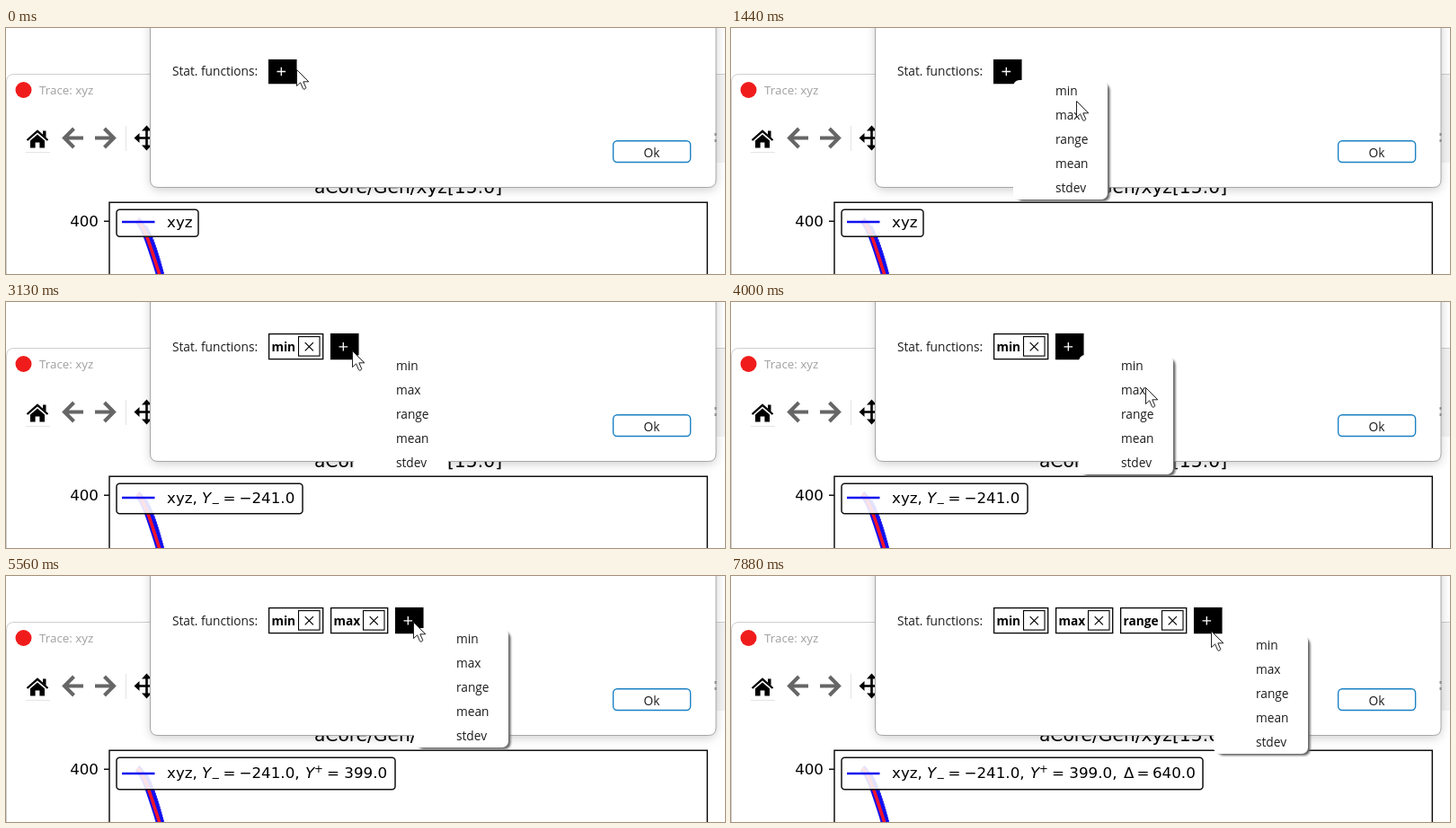
Recreate the animation shown at these times as an HTML page. Size 800x274 px, loop 8000 ms.

```html
<!DOCTYPE html>
<html lang="en">
<head>
<meta charset="utf-8">
<title>Stat. functions</title>
<style>
  html, body { margin: 0; width: 100%; height: 100%; overflow: hidden; background: #fff; }
  svg { display: block; width: 100%; height: 100%; }
  .ui { font: 13.7px "Open Sans", sans-serif; fill: #1c1c1c; }
  .bold { font-weight: 700; fill: #000; }
  .plot { font: 16.7px "DejaVu Sans", sans-serif; fill: #000; }
  .it { font-style: italic; }
  .small { font-size: 11.7px; }
  .box { fill: #fff; stroke: #000; stroke-width: 1.3; }
  .line { fill: none; stroke: #000; stroke-width: 1.2; }
</style>
</head>
<body>
<svg viewBox="0 0 800 274">
  <defs>
    <filter id="soft" x="-10%" y="-20%" width="120%" height="140%"><feGaussianBlur stdDeviation="6"/></filter>
    <filter id="edge" x="-10%" y="-10%" width="120%" height="120%"><feGaussianBlur stdDeviation="0.8"/></filter>
  </defs>
  <rect width="800" height="274" fill="#fff"/>

  <!-- trace window -->
  <path d="M0.5 274V60Q0.5 51.5 9 51.5H800" fill="none" stroke="#cfcfcf"/>
  <rect x="780" y="52" width="20" height="98" fill="#f3f3f3"/>
  <circle cx="19.5" cy="69" r="9" fill="#f01c1c"/>
  <text class="ui" x="37" y="74" style="font-size:13.4px;fill:#a0a0a0">Trace: xyz</text>
  <path d="M22 138.5H49M133.5 109V137" stroke="#e4e4e4" fill="none"/>
  <path d="M23.5 125L35 114.8L46.500 125" fill="none" stroke="#000" stroke-width="2.3"/>
  <path d="M41 114.500H44.500V122L41 119ZM27 125.500L35 118.400L43 125.500V133.500H37.400V127.500H32.600V133.500H27Z"/>
  <g fill="none" stroke="#666" stroke-width="4">
    <path d="M86 122.500H66M75.500 112L65 122.500L75.500 133"/>
    <path d="M99 122.500H119M109.500 112L120 122.500L109.500 133"/>
  </g>
  <path d="M146 122.500H168M156.500 112V133" stroke="#000" stroke-width="2.6"/>
  <path d="M142.500 122.500L148.500 117V128ZM156.500 108.500L151 114.500H162ZM156.500 136.500L151 130.500H162Z"/>

  <!-- plot -->
  <text class="plot" x="447.500" y="183.500" text-anchor="middle" style="font-size:20.200px">aCore/Gen/xyz[15:0]</text>
  <text class="plot" x="103" y="221.300" text-anchor="end">400</text>
  <g fill="none">
    <path id="band" stroke="#1010f0" stroke-width="3"/>
    <path d="M146 214C154 220 161 244 172.500 280" stroke="#1010f0" stroke-width="7.500"/>
    <path d="M146 214C154 220 161 244 172.500 280" stroke="#f0142c" stroke-width="3.600"/>
    <path d="M115 280V194.300H780.300V280M109 215.300H115" stroke="#111" stroke-width="1.500"/>
  </g>
  <g id="legend"></g>

  <!-- dialog -->
  <rect x="161" y="-20" width="629" height="200" rx="8" fill="#000" opacity=".2" filter="url(#soft)"/>
  <path d="M160.500 -5V169Q160.500 177.500 169 177.500H781.500Q790 177.500 790 169V-5Z" fill="#fff" stroke="#a6a6a6"/>
  <path d="M789.500 117V120M789.500 124V127" stroke="#8a8a8a" stroke-width="2"/>
  <rect x="675.600" y="125.700" width="86" height="23.800" rx="4.500" fill="#fff" stroke="#1a80c4" stroke-width="1.400"/>
  <text class="ui" x="718.500" y="143.500" text-anchor="middle">Ok</text>
  <text id="label" class="ui" x="185" y="53">Stat. functions:</text>
  <g id="tokens"></g>
  <g id="plus">
    <rect class="box" x=".6" y="35.600" width="30.300"/>
    <path fill="none" stroke-width="1.300"/>
  </g>

  <g id="menu">
    <rect id="shade" x="4" y="4" width="103.500" height="131" rx="7" fill="#666" filter="url(#edge)"/>
    <rect width="105" height="133" rx="7" fill="#fff"/>
  </g>
  <path id="cursor" d="M.5 .5V18.600L4.600 14.800L7.500 21.600Q8 22.500 9 22.100L10.200 21.500Q11 21 10.600 20.100L7.800 13.800H13.800Z" fill="#fff" stroke="#222" stroke-width="1" stroke-linejoin="round"/>
</svg>
<script>
const NS = "http://www.w3.org/2000/svg";
const LOOP = 8000, STEP = 62.5;
const $ = id => document.getElementById(id);

function add(parent, tag, attrs, text) {
  const el = document.createElementNS(NS, tag);
  for (const k in attrs) el.setAttribute(k, attrs[k]);
  if (text) el.textContent = text;
  parent.appendChild(el);
  return el;
}
const cross = (x, y, r) => `M${x - r} ${y - r}L${x + r} ${y + r}M${x - r} ${y + r}L${x + r} ${y - r}`;

// ragged blue edge along the falling curve
let edge = "";
for (let y = 222; y < 276; y += 3) {
  const x = 146 + 25.5 * Math.pow((y - 214) / 60, 0.62);
  edge += `M${x - 4.6} ${y}h9.200`;
}
$("band").setAttribute("d", edge);

// function tokens
const tokens = [["min", 292, 61], ["max", 361, 64], ["range", 433, 74]].map(([name, x, w]) => {
  const g = add($("tokens"), "g", {});
  add(g, "rect", { class: "box", x: x + .6, y: 35.6, width: w - .9, height: 28 });
  add(g, "text", { class: "ui bold", x: x + 3.5, y: 55.3 }, name);
  add(g, "rect", { class: "box", x: x + w - 27.5, y: 38.6, width: 23.500, height: 21.500, style: "stroke-width:1.1" });
  add(g, "path", { class: "line", d: cross(x + w - 15.7, 49.8, 4.6) });
  return g;
});

// legend: box, sample line and the parts of its text
const frame = add($("legend"), "rect", { x: 123, y: 202.300, rx: 3.500, fill: "#fff", "fill-opacity": .88, stroke: "#111", "stroke-width": 1.500 });
const sample = add($("legend"), "path", { stroke: "#1010f0", "stroke-width": 2.400 });
const words = add($("legend"), "g", {});
const parts = [
  [[179, "xyz"]],
  [[207.500, ","], [218, "Y", "it"], [228.500, "−", "small", 3.500], [241.500, "="], [259.500, "−241.0"]],
  [[321.300, ","], [333, "Y", "it"], [343, "+", "small", -6], [357, "="], [376.300, "399.0"]],
  [[424.300, ","], [437, "Δ"], [451.500, "="], [469, "640.0"]]
].map(list => {
  const g = add(words, "g", {});
  for (const [x, s, cls = "", dy = 0] of list) add(g, "text", { class: "plot " + cls, x, y: dy }, s);
  return g;
});
const looks = [[91, 30, 216, 222.300], [207, 33.500, 218, 224], [310, 35.500, 220, 225], [402, 35.500, 220, 225]];

["min", "max", "range", "mean", "stdev"].forEach((s, i) =>
  add($("menu"), "text", { class: "ui", x: 47, y: 17 + 26.900 * i }, s));

// per round: plus button x, hover step, menu step, pick step, menu corner
const rounds = [
  { x: 292, hover: 0, open: 9, pick: 32, at: [314, 58] },
  { x: 361, hover: 43, open: 48, pick: 71, at: [387, 59] },
  { x: 433, hover: 80, open: 84, pick: 105, at: [454, 58] },
  { x: 515, hover: 117, open: 123, pick: 999, at: [537, 65] }
];

// pointer: step, x, y
const track = [
  [0, 323, 46], [2, 323, 46], [8, 311, 51], [13, 311, 51], [20, 362, 67], [22, 362, 67],
  [23, 384, 81], [25, 384, 81], [26, 383, 78], [28, 382, 73], [38, 382, 73], [44, 385, 56],
  [45, 385, 54], [51, 385, 54], [60, 459, 93], [64, 461, 95], [72, 461, 95], [80, 450, 53],
  [82, 448, 51], [84, 453, 51], [92, 453, 51], [103, 520, 122], [105, 523, 122],
  [107, 565, 98], [111, 470, 50], [112, 472, 50], [117, 519, 52], [118, 528, 57], [119, 534, 61], [128, 534, 61]
];
function pointer(k) {
  let i = 0;
  while (i < track.length - 2 && track[i + 1][0] <= k) i++;
  const [a, ax, ay] = track[i], [b, bx, by] = track[i + 1];
  const u = (k - a) / (b - a), e = u * u * (3 - 2 * u);
  return [ax + (bx - ax) * e, ay + (by - ay) * e];
}

const [plusBox, plusSign] = $("plus").children;
const show = (el, on) => el.setAttribute("visibility", on ? "visible" : "hidden");
const move = (el, x, y) => el.setAttribute("transform", `translate(${x} ${y})`);

function draw(ms) {
  const k = Math.floor((ms % LOOP + 5) / STEP);
  const count = delay => rounds.filter(r => k >= r.pick + delay).length;
  const n = count(1), m = count(2);

  tokens.forEach((g, i) => show(g, i < n));
  $("label").setAttribute("y", n ? 55 : 53);
  const r = rounds[n], dark = k >= r.hover, mid = n ? 49.800 : 48.500;
  move($("plus"), r.x, 0);
  plusBox.setAttribute("height", n ? 28 : 26);
  plusBox.style.fill = dark ? "#000" : "#fff";
  plusSign.setAttribute("stroke", dark ? "#fff" : "#000");
  plusSign.setAttribute("d", `M9.500 ${mid}h9.600M14.300 ${mid - 4.8}v9.600`);

  const [w, h, lineY, base] = looks[m];
  frame.setAttribute("width", w);
  frame.setAttribute("height", h);
  sample.setAttribute("d", `M129 ${lineY}H165.500`);
  move(words, 0, base);
  parts.forEach((g, i) => show(g, i <= m));

  const open = rounds.find(q => k >= q.open && k < q.pick);
  show($("menu"), open);
  if (open) {
    move($("menu"), ...open.at);
    $("shade").setAttribute("opacity", k >= open.open + 3 ? 1 : 0);
  }
  move($("cursor"), ...pointer(k));
}

function tick() {
  draw(performance.now());
  requestAnimationFrame(tick);
}
tick();
</script>
</body>
</html>
```
